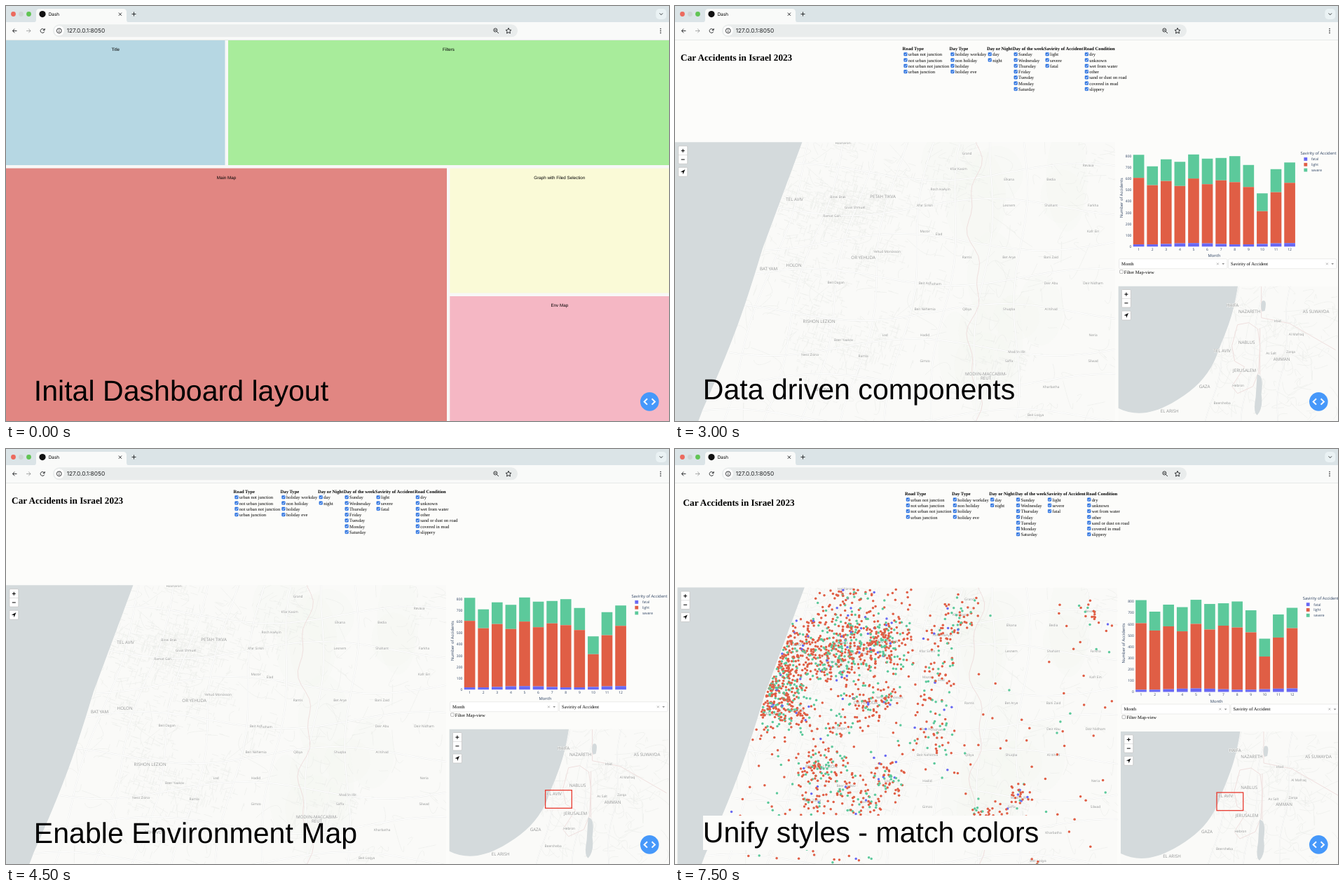
Write an HTML page that moves like this. It is 946 by 592 pixels and loops after 8 s.

```html
<!DOCTYPE html>
<html lang="en">
<head>
<meta charset="utf-8">
<title>Dashboard progress</title>
<style>
html, body { margin: 0; width: 100%; height: 100%; overflow: hidden; background: #fcfcfa; }
svg { display: block; width: 946px; height: 592px; text-rendering: geometricPrecision; }
.serif { font-family: "Liberation Serif", serif; }
.arial { font-family: "Liberation Sans", sans-serif; }
.ui { font-family: Inter, sans-serif; }
.plot { font-family: "Open Sans", sans-serif; fill: #2a3f5f; }
.place { font-family: "Open Sans", sans-serif; fill: #929494; stroke: #fafaf8; stroke-width: 1; paint-order: stroke; }
.mid { text-anchor: middle; }
.end { text-anchor: end; }
.bold { font-weight: bold; }
.icon { fill: none; stroke: #303234; stroke-width: 1; }
.street, .road, .border { fill: none; stroke-linejoin: round; }
.street { stroke: #ebecea; stroke-width: 0.6; }
.border { stroke: #efdfde; }
</style>
</head>
<body>
<svg id="stage" viewBox="0 0 946 592"></svg>
<script>
const stage = document.getElementById('stage');
const BG = '#fcfcfa', SEA = '#d4dadc', LAND = '#fafaf8';
const FATAL = '#6969f3', LIGHT = '#e05e45', SEVERE = '#5cc99b';

// ---- helpers ----
function add(parent, tag, attrs = {}, text) {
  const el = document.createElementNS('http://www.w3.org/2000/svg', tag);
  for (const key in attrs) el.setAttribute(key, attrs[key]);
  if (text !== undefined) el.textContent = text;
  parent.append(el);
  return el;
}
const group = (parent, attrs) => add(parent, 'g', attrs);
const rect = (parent, x, y, width, height, fill, more) =>
  add(parent, 'rect', { x, y, width, height, fill, ...more });
const circle = (parent, cx, cy, r, fill, more) => add(parent, 'circle', { cx, cy, r, fill, ...more });
const path = (parent, d, attrs = { class: 'icon' }) => add(parent, 'path', { d, ...attrs });
const label = (parent, x, y, text, size, cls, more) =>
  add(parent, 'text', { x, y, 'font-size': size, class: cls, ...more }, text);
const range = (from, to, step = 1) =>
  Array.from({ length: Math.floor((to - from) / step) + 1 }, (_, i) => from + i * step);
const times = (count, fn) => { for (let i = 0; i < count; i++) fn(i); };
const trace = points => 'M' + points.map(p => p.map(v => v.toFixed(1)).join(' ')).join('L');

function randomFrom(seed) {
  return () => {
    seed = (seed + 0x6d2b79f5) | 0;
    let t = Math.imul(seed ^ (seed >>> 15), 1 | seed);
    t = (t + Math.imul(t ^ (t >>> 7), 61 | t)) ^ t;
    return ((t ^ (t >>> 14)) >>> 0) / 4294967296;
  };
}
const bell = random => (random() + random() + random() - 1.5) * 2;

// ---- first layout ----
const layout = group(stage);
rect(layout, 0, 48, 946, 544, '#f8f8f7');
[
  [0, 49, 312.5, 178, '#b6d7e3', 'Title'],
  [317, 49, 629, 178, '#a8ec9b', 'Filters'],
  [0, 231.5, 629, 361, '#e18682', 'Main Map'],
  [633.3, 231.5, 313, 178, '#fafad7', 'Graph with Filed Selection'],
  [633.3, 414, 313, 178, '#f5b7c4', 'Env Map'],
].forEach(([x, y, w, h, fill, name]) => {
  rect(layout, x, y, w, h, fill);
  label(layout, x + w / 2, y + 15.1, name, 6.25, 'arial mid');
});

// ---- dashboard ----
const dash = group(stage);
rect(dash, 0, 40, 960, 570, BG);
label(dash, 11.5, 81, 'Car Accidents in Israel 2023', 13.22, 'serif bold');

function mapPanel(id, x, y, w, h) {
  rect(add(stage, 'clipPath', { id }), x, y, w, h);
  const g = group(dash, { 'clip-path': `url(#${id})` });
  rect(g, x, y, w, h, LAND);
  return g;
}
function place(parent, x, y, name) {
  const size = name === name.toUpperCase() ? 6.2 : 4.8;
  label(parent, x, y + size * 0.36, name, size, 'place mid');
}
function road(parent, points, width) {
  const d = trace(points);
  path(parent, d, { class: 'road', stroke: '#e8e9e7', 'stroke-width': width + 0.7 });
  path(parent, d, { class: 'road', stroke: '#fff', 'stroke-width': width });
}
function lanes(parent, random, count, x, y, w, h) {
  const bend = () => (bell(random) * 16).toFixed(1);
  let d = '';
  times(count, () => {
    d += `M${(x + random() * w).toFixed(1)} ${(y + random() * h).toFixed(1)}q${bend()} ${bend()} ${bend()} ${bend()}`;
  });
  path(parent, d, { class: 'street' });
}
function mapButtons(parent, x, y) {
  const edge = { stroke: '#c4c5c4', 'stroke-width': 0.8, rx: 1.2 };
  rect(parent, x, y, 13, 25.5, '#fff', edge);
  rect(parent, x, y + 30.5, 13, 13, '#fff', edge);
  path(parent, `M${x} ${y + 12.8}h13`, { stroke: '#ccc', 'stroke-width': 0.6 });
  path(parent, `M${x + 4} ${y + 6.7}h5m-2.5-2.5v5M${x + 4} ${y + 19.3}h5`, { stroke: '#000', 'stroke-width': 1 });
  path(parent, `M${x + 9.6} ${y + 33.6}l-6.5 3.2 3.1.5.5 3.2z`, { fill: '#111' });
}

// Main map: towns give labels, streets and accident density (x, y, weight)
const towns = `174 279 120 TEL AVIV|300 275 120 PETAH TIKVA|137 378 0 BAT YAM|173 373 70 HOLON
272 362 65 OR YEHUDA|209 453 95 RISHON LEZION|447 528 60 MODIIN-MACCABIM-|447 534 0 REUT|215 550 25 REHOVOT
243 199 40 HaSharon|408 236 40 Kfar Kasim|382 265 40 Rosh HaAyin|236 276 110 Binei Brak|260 291 80 Givat Shmuel
227 303 80 Ramat Gan|380 329 12 Elad|306 354 20 Yehud Monosson|374 400 14 Shoham|233 398 15 Beit Dagan
303 473 50 Lod|244 480 25 Beer Yaakov|196 501 30 Ness Ziona|272 503 45 Ramla|491 497 28 Modi'in Illit
593 231 16 Revava|518 587 5 Beit Loqya`.split(/[|\n]/).map(entry => {
  const [x, y, weight, ...name] = entry.split(' ');
  return { x: +x, y: +y, weight: +weight, name: name.join(' ') };
});
const villages = [
  '|Grand|||', '||Elkana|Bedia|', 'Kfar Sirkin||Lesnem|Shahant|Farkha', 'Mazor||||Kafr Ein',
  '|Rantis|Bet Arye|Bani Zaid|', 'Beit Arif|||Deir Abu|Deir Nidham', 'Beit Nehemia|Qibya|Shuqba|Al Itihad|',
  'Hadid||||Neria', 'Gimzo||Saffa||Silwad', '|||Kharbatha|'
];

const coastX = y => 185 - 0.372 * (y - 197) + 5 * Math.max(0, Math.sin((y - 350) / 73));
const northRoad = k => range(190, 600, 10).map(y => [coastX(y) * (1 - k / 9) + 64 * k - 30 + 7 * Math.sin(y / 45 + k), y]);
const eastRoad = k => range(coastX(190 + 50 * k), 640, 12).map(x => [x, 190 + 50 * k + 12 * Math.sin(x / 65 + k * 2)]);

const map = mapPanel('mapClip', 3.5, 197.5, 628, 400);
const streetRandom = randomFrom(17);
times(14, () => add(map, 'ellipse', {
  cx: 380 + streetRandom() * 260, cy: 200 + streetRandom() * 390,
  rx: 15 + streetRandom() * 30, ry: 30 + streetRandom() * 50, fill: '#f3f5f1', opacity: 0.45
}));
let streets = '';
towns.forEach(({ x, y, weight }) => times(weight * 1.4, () => {
  const spread = 6 + Math.sqrt(weight) * 1.7, size = 4 + streetRandom() * 9;
  const angle = 0.3 + (streetRandom() < 0.5 ? Math.PI / 2 : 0);
  const px = x + bell(streetRandom) * spread, py = y + bell(streetRandom) * spread;
  streets += trace([[px, py], [px + Math.cos(angle) * size, py + Math.sin(angle) * size]]);
}));
path(map, streets, { class: 'street' });
lanes(map, streetRandom, 260, 100, 197, 530, 395);
range(1, 8).forEach(k => {
  road(map, northRoad(k), 1.3);
  road(map, eastRoad(k), 1.3);
});
path(map, trace(range(190, 600, 10).map(y => [430 + 8 * Math.sin(y / 28) + 4 * Math.sin(y / 11), y])), { class: 'border' });
path(map, trace(range(190, 600, 5).map(y => [coastX(y), y])) + 'H0V190z', { fill: SEA });
towns.forEach(({ x, y, name }) => place(map, x, y, name));
villages.forEach((row, r) => row.split('|').forEach((name, c) => place(map, 360 + 60 * c, 214 + 37 * r, name)));

const blueDots = group(map), colorDots = group(map);
const random = randomFrom(2023);
function accident(x, y) {
  if (y < 199 || y > 594 || x < coastX(y) + 2) return;
  const pick = random(), cx = x.toFixed(1), cy = y.toFixed(1);
  circle(blueDots, cx, cy, 2.25, '#0000fb');
  circle(colorDots, cx, cy, 1.75, pick < 0.68 ? LIGHT : pick < 0.965 ? SEVERE : FATAL);
}
towns.forEach(({ x, y, weight }) => times(weight, () => {
  const spread = 4 + Math.sqrt(weight) * 1.4;
  accident(x + bell(random) * spread, y + bell(random) * spread);
}));
times(330, () => {
  const y = 338 + bell(random) * 32;
  accident(coastX(y) + 3 + 48 * random() ** 1.4, y);
});
times(190, () => accident(195 + random() * 145, 200 + random() * 125));
times(190, () => {
  const y = 330 + random() * 260;
  accident(coastX(y) + 10 + random() * 230, y);
});
times(60, () => accident(378 + bell(random) * 13, 300 + random() * 170));
times(60, () => accident(400 + random() * 230, 200 + random() * 390));
mapButtons(map, 8.2, 203);

// Overview map
const mini = mapPanel('miniClip', 636, 403, 320, 200);
lanes(mini, randomFrom(5), 150, 765, 403, 185, 185);
range(0, 2).forEach(k => road(mini, range(400, 600, 10).map(y =>
  [806 + 38 * k - (y - 400) * (0.22 - 0.06 * k) + 3 * Math.sin(y / 20 + k), y]), 0.8));
path(mini, 'M806 458l16-3 13 9 3 24-2 38-8 20-22 10-8-10 18-28-14-8-4-22zM840 403v45l40 8 66 38M838 463v66', { class: 'border' });
path(mini, 'M630 398H807C800 450 788 470 777 500S745 552 712 570S655 588 630 574z', { fill: SEA });
path(mini, 'M841 424q8-3 4 14l-4 1q-3-8 0-15zM834 529q10 0 6 28 3 20-6 30-6-4-2-26z', { fill: SEA });
`799 430 HAIFA|823 439 NAZARETH|918 439 AS SUWAYDA|819 483 NABLUS|784 495 TEL AVIV|759 546 GAZA|709 581 EL ARISH
869 507 AMMAN|816 523 JERUSALEM|863 453 Irbid|890 472 Al Mafraq|854 499 As Salt|882 497 Zarqa|784 570 Beersheba
807 545 Hebron`.split(/[|\n]/).forEach(entry => {
  const [x, y, ...name] = entry.split(' ');
  place(mini, +x, +y, name.join(' '));
});
const focus = rect(mini, 773, 490, 37.7, 25.7, 'none', { stroke: '#e8392f', 'stroke-width': 1.3 });
mapButtons(mini, 640.8, 407.8);

// Chart
const BASE = 346.5, UNIT = 0.16125;
const allCounts = [812, 710, 772, 750, 815, 778, 784, 800, 722, 471, 685, 744];
const notSevere = [608, 543, 580, 536, 602, 552, 586, 570, 527, 313, 481, 564];
const fatalCount = month => 25 + 6 * Math.sin(month * 0.9 - 2);

function chart(parent, step, yName, xName, legend, legendX, swatchX) {
  allCounts.forEach((total, i) => {
    const x = 665 + i * step, width = step * 0.8;
    const bar = (from, to, fill) => rect(parent, x - width / 2, BASE - to * UNIT, width, (to - from) * UNIT, fill);
    bar(notSevere[i], total, SEVERE);
    bar(fatalCount(i), notSevere[i], LIGHT);
    bar(0, fatalCount(i), FATAL);
    label(parent, x, 352.2, i + 1, 5, 'plot mid');
  });
  range(0, 800, 100).forEach(v => label(parent, 654.8, BASE - v * UNIT + 1.8, v, 5, 'plot end'));
  label(parent, 0, 0, yName, 5.8, 'plot mid', { transform: 'translate(642 277) rotate(-90)' });
  label(parent, 665 + step * 5.5, 361.5, xName, 5.8, 'plot mid');
  label(parent, legendX, 215.2, legend, 5.8, 'plot');
  [['fatal', FATAL], ['light', LIGHT], ['severe', SEVERE]].forEach(([name, fill], i) => {
    const y = 221.7 + i * 7.8;
    rect(parent, swatchX, y - 2.4, 4.8, 4.8, fill);
    label(parent, swatchX + 10.5, y + 1.8, name, 5, 'plot');
  });
}

// Filters and dropdowns
function checkbox(parent, x, y, checked) {
  rect(parent, x, y, 4.7, 4.7, checked ? '#2f74e0' : '#fff',
    { rx: 0.8, stroke: checked ? '#2f74e0' : '#777', 'stroke-width': 0.5 });
  if (checked) path(parent, `M${x + 1} ${y + 2.4}l1.1 1.2 1.8-2.5`, { fill: 'none', stroke: '#fff', 'stroke-width': 0.8 });
}
function filterColumn(parent, x, title, items, checkedFrom = 0) {
  label(parent, x, 66.4, title, 6.58, 'serif bold');
  items.split('|').forEach((item, i) => {
    checkbox(parent, x + 2, 69.7 + i * 8.27, i >= checkedFrom);
    label(parent, x + 8.3, 74.7 + i * 8.27, item, 6.58, 'serif');
  });
}
const draft = group(dash), live = group(dash);
[637, 793].forEach((x, i) => {
  rect(dash, x, 364, 154.3, 14, '#fff', { stroke: '#e4e4e2', 'stroke-width': 0.7, rx: 1.5 });
  path(dash, `M${x + 139.4} 369.7l2.8 2.8m0-2.8l-2.8 2.8`, { stroke: '#8a8a8a', 'stroke-width': 0.6 });
  path(dash, `M${x + 146.7} 370.4h3.8l-1.9 2z`, { fill: '#888' });
  const text = (parent, value) => label(parent, x + 3.5, 373.2, value, 6.58, 'serif');
  dash.append(draft, live);
  text(draft, 'Montréal');
  text(live, ['Month', 'Savirity of Accident'][i]);
});
checkbox(dash, 638, 380, false);
label(dash, 644.2, 385.2, 'Filter Map-view', 6.58, 'serif');

times(6, i => filterColumn(draft, 328 + i * 48.35, `Filter ${i + 1}`, 'New York City|Montréal|San Francisco', 1));
label(draft, 651.5, 202.8, 'Number of Accidents per Month', 7, 'plot');
chart(draft, 20.09, 'count', 'HODESH_TEUNA', 'HUMRAT_TEUNA', 902, 906.8);
[
  [328, 'Road Type', 'urban not junction|not urban junction|not urban not junction|urban junction'],
  [395, 'Day Type', 'holiday workday|non holiday|holiday|holiday eve'],
  [448.3, 'Day or Night', 'day|night'],
  [485.2, 'Day of the week', 'Sunday|Wednesday|Thursday|Friday|Tuesday|Monday|Saturday'],
  [530.2, 'Savirity of Accident', 'light|severe|fatal'],
  [586.4, 'Road Condition', 'dry|unknown|wet from water|other|sand or dust on road|covered in mud|slippery'],
].forEach(column => filterColumn(live, ...column));
chart(live, 19.59, 'Number of Accidents', 'Month', 'Savirity of Accident', 895.8, 900.8);

// ---- browser frame ----
const browser = group(stage);
rect(browser, 0, 0, 946, 24, '#dbe4e7');
rect(browser, 0, 23, 946, 25.3, '#f9faf9');
rect(browser, 0, 48, 946, 0.8, '#e3e5e4');
path(browser, 'M39 23.5q4 0 4-4V9q0-5 5-5h119q5 0 5 5v10.5q0 4 4 4z', { fill: '#f9faf9' });
['#ec6a5e', '#cfd5d6', '#61c454'].forEach((fill, i) => circle(browser, 10.5 + 11 * i, 11.5, 3.4, fill));
circle(browser, 52, 11.6, 4.6, '#111');
label(browser, 60.7, 13.9, 'Dash', 6.4, 'ui');
path(browser, 'M160.8 9.6l4.2 4.2m0-4.2l-4.2 4.2M179.5 11.5h6m-3-3v6');
rect(browser, 927.3, 4, 15, 15, '#eaf2f4', { rx: 5 });
path(browser, 'M932.6 10.4l2.2 2.2 2.2-2.2');
path(browser, 'M15.5 35.4h-6m2.8-2.9l-2.9 2.9 2.9 2.9');
path(browser, 'M29 35.4h6m-2.8-2.9l2.9 2.9-2.9 2.9', { class: 'icon', opacity: 0.4 });
path(browser, 'M54.6 34a2.9 2.9 0 1 0 .2 2.4M55.2 32v2.5h-2.5');
rect(browser, 67, 26.3, 663, 18, '#e9ecec', { rx: 9 });
circle(browser, 75.8, 35.3, 7, '#fff');
circle(browser, 75.8, 35.3, 3.4, 'none', { class: 'icon' });
path(browser, 'M75.8 34.8v2.4M75.8 33.2v.9');
label(browser, 86.7, 38.2, '127.0.0.1:8050', 8.3, 'ui', { fill: '#202224' });
circle(browser, 698.3, 34.4, 2.5, 'none', { class: 'icon' });
path(browser, 'M700.2 36.3l2.7 2.7M697 34.4h2.6');
path(browser, 'M717 31.4l1.2 2.6 2.8.3-2.1 1.9.6 2.8-2.5-1.4-2.5 1.4.6-2.8-2.1-1.9 2.8-.3z');
range(-1, 1).forEach(i => circle(browser, 934, 35.4 + 2.9 * i, 0.85, '#303234'));

// ---- captions and overlay button ----
const captions = [
  ['Inital Dashboard layout', 562.5], ['Static placeholder components', 561.8], ['Data driven components', 560.5],
  ['Enable Environment Map', 562], ['Add Data Points', 561.5, 298], ['Unify styles - match colors', 561, 481]
].map(([text, y, boxWidth]) => {
  const g = group(stage);
  if (boxWidth) rect(g, 40, 523, boxWidth, 49, BG);
  label(g, 39.8, y, text, 41.1, 'arial');
  return g;
});
circle(stage, 918.3, 564.4, 13.3, '#4698fa');
path(stage, 'M915 560.2l-4.3 4.2 4.3 4.2M921.6 560.2l4.3 4.2-4.3 4.2', { fill: 'none', stroke: '#fff', 'stroke-width': 2 });

// ---- timeline ----
const LOOP = 8000, HOLD = 1500;
const show = (el, on) => el.setAttribute('display', on ? 'inline' : 'none');

function setScene(n) {
  show(layout, n === 0);
  show(dash, n > 0);
  show(draft, n === 1);
  show(live, n > 1);
  show(focus, n > 2);
  show(blueDots, n === 4);
  show(colorDots, n === 5);
  dash.setAttribute('transform', n === 2 || n === 3 ? 'translate(-3.4 -3.3)' : '');
  captions.forEach((caption, i) => show(caption, i === n));
}
const start = performance.now();
let shown = -1;
function tick() {
  const scene = Math.floor((performance.now() - start) % LOOP / HOLD);
  if (scene !== shown) setScene(shown = scene);
  requestAnimationFrame(tick);
}
tick();
</script>
</body>
</html>
```
